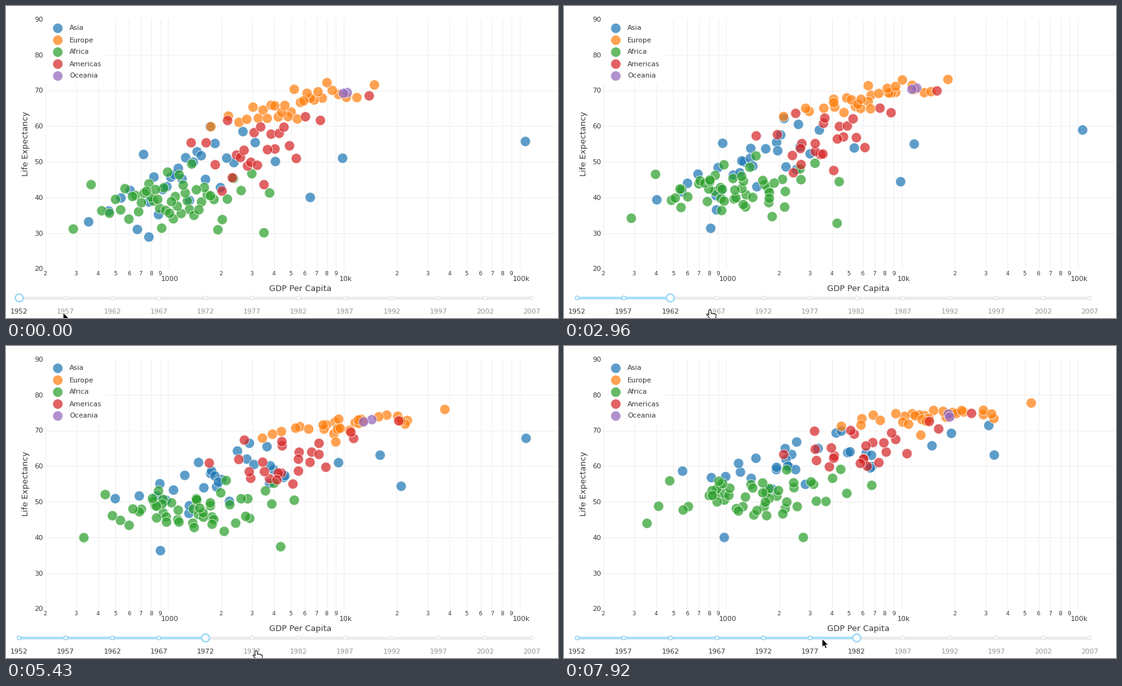
Write a matplotlib script that moves like this. It is 879 px wide and 497 px high and loops after 8000 ms.

```python
import numpy as np
import matplotlib.pyplot as plt
from matplotlib.animation import FuncAnimation
from matplotlib.patches import Circle, Polygon, Rectangle

W, H, DPI = 879, 497, 64
PX = 72 / DPI
STEP, LOOP = 50, 8000
INK, FADED, BLUE = "#3a3a3a", "#979797", "#8fd4f5"
plt.rcParams["font.family"] = "DejaVu Sans"
rng = np.random.default_rng(11)

# Per continent: colour, number of dots,
# log GDP at the start (mean, spread), life (mean, rise per decade of GDP, spread),
# growth of log GDP (mean, spread), share of the way to LIFE_CAP gained
GROUPS = {
    "Asia": ("#1f77b4", 29, (3.08, 0.30), (46, 14, 6.5), (0.33, 0.2), 0.45),
    "Europe": ("#ff7f0e", 30, (3.71, 0.26), (65.8, 15, 2.4), (0.45, 0.08), 0.6),
    "Africa": ("#2ca02c", 51, (3.02, 0.27), (39.3, 4, 4.6), (0.15, 0.16), 0.31),
    "Americas": ("#d62728", 24, (3.50, 0.22), (53.5, 18, 6.5), (0.27, 0.1), 0.45),
    "Oceania": ("#9467bd", 2, (4.01, 0.03), (69.2, 10, 0), (0.26, 0.04), 0.5),
}
LIFE_CAP = 79

# Dots that stand apart from their cloud, as evenly timed (GDP, life) points
LONERS = {
    "Asia": [
        [(108382, 55.6), (113523, 58), (95459, 60.5), (80895, 64.6),
         (109348, 67.7), (59265, 69.3), (31354, 71.3)],
        [(6460, 39.9), (16903, 49.9), (33693, 63)],
        [(9867, 50.9), (14805, 59.9), (19211, 69.1)],
        [(779, 28.8), (978, 39.9)],
    ],
    "Africa": [[(3521, 30), (5523, 36), (2757, 39.9)]],
    "Americas": [[(13990, 68.4), (25010, 74.7)]],
}

MOVES = [1500, 2750, 3940, 4920, 6070, 7120]   # dots start towards the next year
JUMPS = [1060, 2440, 3490, 4820, 5790, 7030]   # slider jumps to the next year
MOVE_MS = 520
CLICKS = [360, 860, 2270, 3320, 4640, 5610, 6850]
CLICK_MS = 175
# time, x, y of the pointer tip
POINTER = np.array([
    (0, 91, 488), (540, 91, 489), (620, 95, 487), (1100, 95, 487),
    (1850, 175, 483), (2500, 175, 483), (3050, 241, 485), (3600, 241, 485),
    (3900, 301, 486), (4800, 301, 486), (4990, 381, 493), (5150, 398, 486),
    (6100, 398, 486), (6450, 448, 485), (7780, 448, 485), (7890, 411, 466),
])
ARROW = np.array([(0, 0), (0, 14), (3.2, 11.2), (5.4, 16), (7.8, 15), (5.6, 10.3), (10, 10.3)])
HAND = np.array([
    (-1.5, 0), (0.3, -1), (2, 0), (2.2, 5), (4, 4.5), (5, 5.5), (7, 5), (8, 6.3),
    (9.5, 6), (10.3, 7.5), (10, 11), (8.5, 14), (1, 14), (-1.5, 10.5),
    (-4.5, 7.5), (-4.5, 6), (-3, 5.8), (-1.2, 7.5),
])


def px_x(log_gdp):
    return 257.9 + 279.7 * (log_gdp - 3)


def px_y(life):
    return 418 - 5.68 * (life - 20)


def bell(n):
    """Evenly drawn bell-shaped scores in random order."""
    q = np.arange(1, n + 1) / (n + 1)
    return rng.permutation(np.log(q / (1 - q)) / 1.9)


def cloud_courses(n, wealth, health, growth, gain):
    """Positions of n countries in the seven survey years, shape (7, n, 2)."""
    s = np.linspace(0, 1, 7)[:, None]
    x = wealth[0] + wealth[1] * bell(n)
    y = health[0] + health[1] * (x - wealth[0]) + health[2] * bell(n)
    y = np.minimum(y, 73)
    log_gdp = x + s * (growth[0] + growth[1] * bell(n))
    log_gdp = log_gdp + 0.03 * np.sin(np.pi * s) * rng.normal(size=(7, n))
    rise = gain * (LIFE_CAP - y) * (1 + 0.2 * bell(n))
    life = y + rise * (s + 0.3 * gain * s * (1 - s))
    return np.stack([px_x(log_gdp), px_y(life)], axis=-1)


def loner_course(points):
    gdp, life = np.transpose(points)
    s, knots = np.linspace(0, 1, 7), np.linspace(0, 1, len(points))
    log_gdp = np.interp(s, knots, np.log10(gdp))
    return np.stack([px_x(log_gdp), px_y(np.interp(s, knots, life))], axis=-1)[:, None]


def ease(u):
    u = np.clip(u, 0, 1)
    return 4 * u**3 if u < 0.5 else 1 - 4 * (1 - u) ** 3


parts, colors = [], []
for name, (color, *shape) in GROUPS.items():
    group = [cloud_courses(*shape)] + [loner_course(p) for p in LONERS.get(name, [])]
    parts += group
    colors += [color] * sum(p.shape[1] for p in group)
courses = np.concatenate(parts, axis=1)

fig = plt.figure(figsize=(W / DPI, H / DPI), dpi=DPI, facecolor="white")
ax = fig.add_axes([0, 0, 1, 1])
ax.set(xlim=(0, W), ylim=(H, 0))
ax.axis("off")


def label(x, y, s, size=11, color=INK, ha="center", va="center_baseline", **kw):
    return ax.text(x, y, s, fontsize=size * PX, color=color, ha=ha, va=va, **kw)


def line(x, y, color="#eeeeee", width=1, z=0):
    return ax.plot(x, y, color=color, lw=width * PX, zorder=z, solid_capstyle="butt")[0]


def dots(xy, colors, z):
    return ax.scatter(*np.transpose(xy), s=(16 * PX) ** 2, c=colors, alpha=0.72,
                      edgecolors="white", linewidths=PX, zorder=z)


# Grid and tick labels
for k in (100, 1000, 10000, 100000):
    for m in range(1, 10):
        x = px_x(np.log10(k * m))
        if not 60 < x < 830:
            continue
        line([np.floor(x) + 0.5] * 2, [20, 418])
        if m > 1:
            label(x, 425.5, str(m), 9)
        else:
            label(x + 3, 433.5, "1000" if k == 1000 else f"{k // 1000}k")
for v in range(20, 91, 10):
    y = px_y(v)
    if 20 < v < 90:
        line([62, 877], [np.floor(y) + 0.5] * 2)
    label(59.5, y + 0.5, str(v), ha="right")
label(469, 449, "GDP Per Capita", 13)
label(31, 219, "Life Expectancy", 13, rotation=90, va="center")

# Legend
ax.add_patch(Rectangle((63, 19), 95, 105, fc="white", ec="none", zorder=1))
for i, (name, (color, *_)) in enumerate(GROUPS.items()):
    dots([(81.5, 34.5 + 19 * i)], [color], 2)
    label(101, 34.5 + 19 * i, name, ha="left")

cloud = dots(courses[0], colors, 3)

# Slider
STOPS = np.linspace(21, 837, 12)
RAIL_Y = 465
line([21, 837], [RAIL_Y] * 2, "#ececec", 5, 4)
past = line([21, 21], [RAIL_Y] * 2, "#a6e0fc", 4, 5)
stops = ax.scatter(STOPS, [RAIL_Y] * 12, s=(6 * PX) ** 2, c="white",
                   linewidths=1.5 * PX, zorder=6)
grip = ax.add_patch(Circle((21, RAIL_Y), 6.2, fc="white", ec=BLUE, lw=2 * PX, zorder=7))
years = [label(x, 486, str(1952 + 5 * i)) for i, x in enumerate(STOPS)]

ring = ax.add_patch(Circle((0, 0), 9.5, fc="none", ec="#333333", lw=PX, zorder=8))
pointer = ax.add_patch(Polygon(ARROW, closed=True, lw=PX, zorder=9))


def draw_slider(t):
    now = sum(t >= j for j in JUMPS)
    past.set_xdata([21, STOPS[now]])
    grip.center = (STOPS[now], RAIL_Y)
    stops.set_edgecolors([BLUE if i <= now else "#e6e6e6" for i in range(12)])
    for i, year in enumerate(years):
        year.set_color(INK if i <= now else FADED)


def draw_pointer(t):
    x, y = (np.interp(t, POINTER[:, 0], POINTER[:, i]) for i in (1, 2))
    over_year = np.abs(STOPS - x).min() < 19 and 472 < y < 487.5
    pointer.set_xy((HAND if over_year else ARROW) + (x, y))
    pointer.set_facecolor("white" if over_year else "black")
    pointer.set_edgecolor("black" if over_year else "white")
    ring.center = (x + 2, y - 3)
    ring.set_visible(any(0 <= t - c < CLICK_MS for c in CLICKS))


def draw(n):
    t = n * STEP + STEP / 2
    pos = sum(ease((t - m) / MOVE_MS) for m in MOVES)
    k = min(int(pos), 5)
    cloud.set_offsets(courses[k] + (pos - k) * (courses[k + 1] - courses[k]))
    draw_slider(t)
    draw_pointer(t)
    return cloud, past, grip, stops, ring, pointer, *years


anim = FuncAnimation(fig, draw, frames=LOOP // STEP, interval=STEP,
                     repeat=True, repeat_delay=0, blit=False)
plt.show()
```
